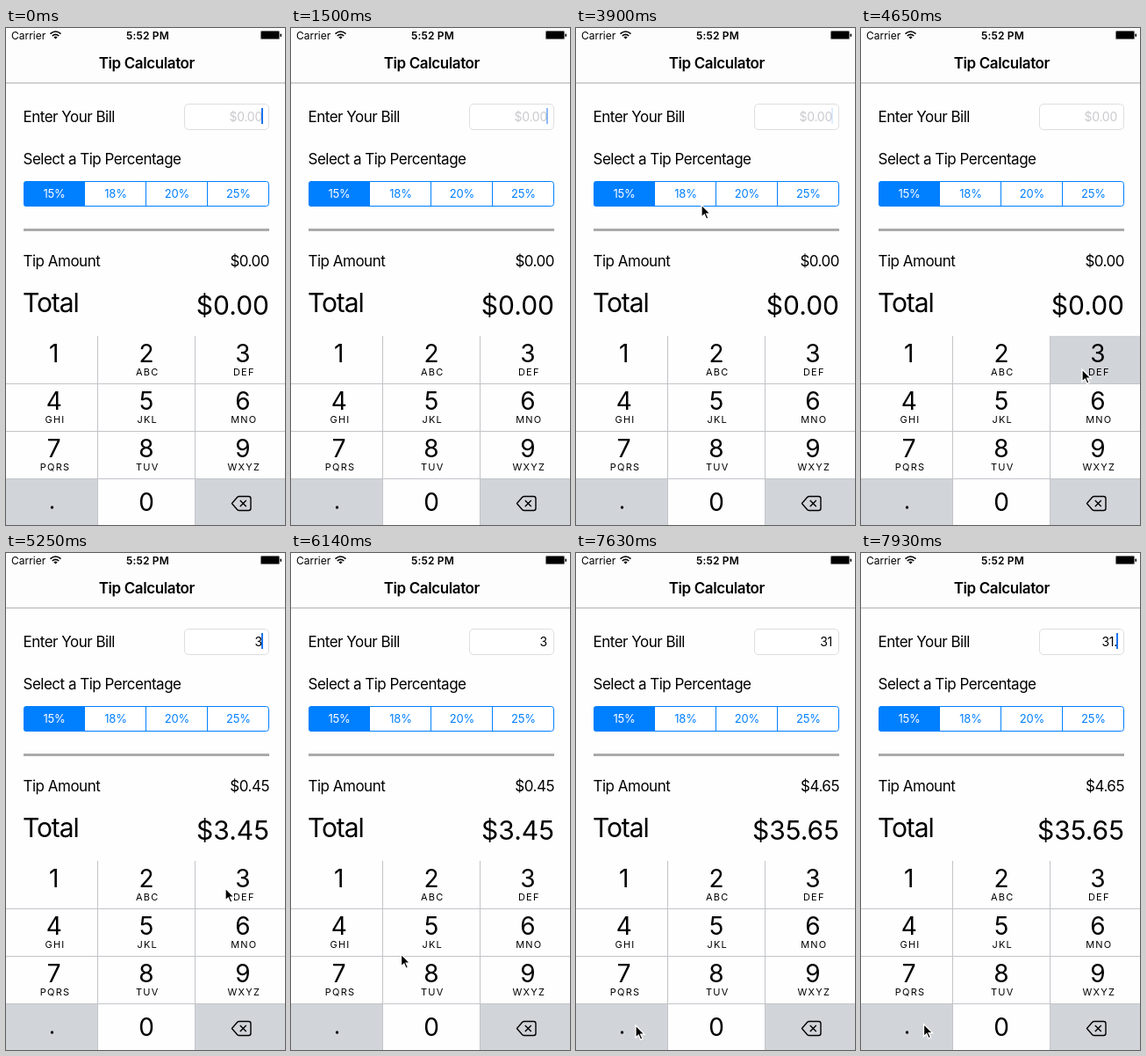
An HTML page that plays this animation: 318 by 565 pixels, repeating every 8 s.

```html
<!DOCTYPE html>
<html lang="en">
<head>
<meta charset="utf-8">
<title>Tip Calculator</title>
<style>
  html, body { margin: 0; width: 100%; height: 100%; overflow: hidden; background: #fff; }
  svg { display: block; font-family: Inter, Roboto, sans-serif; }
  .body { font-size: 17px; letter-spacing: -.5px; }
  .big { font-size: 30px; }
  .mid { text-anchor: middle; }
  .end { text-anchor: end; }
  .digit { font-size: 28px; text-anchor: middle; }
  .letters { font-size: 11px; letter-spacing: 1.2px; text-anchor: middle; }
  .bill { font-size: 14px; letter-spacing: -.25px; text-anchor: end; }
  .seg { font-size: 13px; letter-spacing: -.2px; text-anchor: middle; }
</style>
</head>
<body>
<svg width="318" height="565" viewBox="0 0 318 565">
  <rect width="318" height="565" fill="#fefefe"/>

  <!-- status and title bar -->
  <rect width="318" height="62" fill="#fdfdfd"/>
  <path d="M0 62.5H318" stroke="#b2b2b2"/>
  <text x="6" y="13" font-size="12">Carrier</text>
  <g fill="none" stroke="#000" stroke-width="1.6">
    <path d="M50.5 6.6Q56.5 1.4 62.5 6.6M52.7 9Q56.5 5.8 60.3 9"/>
    <path d="M54.4 10.4Q56.5 8.8 58.6 10.4L56.5 12.6Z" fill="#000" stroke="none"/>
  </g>
  <text class="mid" x="161.5" y="13" font-size="12" font-weight="600" letter-spacing=".15">5:52 PM</text>
  <rect x="290" y="3" width="22" height="10" rx="1.5" fill="#777"/>
  <rect x="291" y="4" width="20" height="8" rx="1"/>
  <rect x="312.5" y="6.5" width="1.5" height="3.5" rx=".7"/>
  <text class="mid" x="160.3" y="46" font-size="17" font-weight="600" letter-spacing="-.4">Tip Calculator</text>

  <!-- form -->
  <text class="body" x="19.5" y="106.5">Enter Your Bill</text>
  <rect x="203.5" y="86.5" width="96" height="29" rx="4.5" fill="#fff" stroke="#dedede"/>
  <text class="bill" id="bill" x="292" y="105.5"></text>
  <rect id="caret" x="291" y="91" width="2" height="18" fill="#1a74ee"/>
  <text class="body" x="19.5" y="154.5">Select a Tip Percentage</text>
  <g id="segments">
    <rect x="20.5" y="174.5" width="279" height="28" rx="3" fill="#fff" stroke="#007fff"/>
    <path d="M90 174H23.5a3.5 3.5 0 0 0-3.5 3.5v22a3.5 3.5 0 0 0 3.5 3.5H90z" fill="#007fff"/>
    <path d="M89.5 174V203M159.5 174V203M229.5 174V203" stroke="#007fff"/>
  </g>
  <rect x="20" y="228" width="280" height="3" fill="#aaa"/>
  <text class="body" x="19.5" y="270.5">Tip Amount</text>
  <text class="body end" id="tip" x="300" y="270.5"></text>
  <text class="big" x="19" y="323" letter-spacing="-1.1">Total</text>
  <text class="big end" id="total" x="300" y="326"></text>

  <!-- keypad -->
  <g id="keys"></g>
  <path d="M104.5 350V565M215.5 350V565M0 404.5H318M0 458.5H318M0 512.5H318" stroke="#c2c4c8"/>
  <g id="labels"></g>
  <g fill="none" stroke="#000" stroke-width="1.4" stroke-linejoin="round">
    <path d="M257.5 540.5L263.5 533.5Q264.5 532.5 266 532.5H276.5Q279 532.5 279 535V546Q279 548.5 276.5 548.5H266Q264.5 548.5 263.5 547.5Z"/>
    <path d="M266.8 537L273.8 544M273.8 537L266.8 544"/>
  </g>

  <path id="cursor" d="M0 0V14L3.3 11L5.6 16.3L8 15.2L5.7 10.1H10Z" stroke="#fff" stroke-width="1.3"/>
</svg>
<script>
const $ = id => document.getElementById(id);
const LOOP = 8000, STEP = 149.6;
const GREY = '#d1d4d9', WHITE = '#fefefe';

function add(parent, tag, attrs, text = '') {
  const el = document.createElementNS('http://www.w3.org/2000/svg', tag);
  for (const name in attrs) el.setAttribute(name, attrs[name]);
  el.textContent = text;
  return parent.appendChild(el);
}

[15, 18, 20, 25].forEach((rate, i) =>
  add($('segments'), 'text', { class: 'seg', x: 55 + 70 * i, y: 193, fill: i ? '#007fff' : '#fff' }, rate + '%'));

const columns = [[0, 105, 54.7], [105, 111, 160], [216, 102, 270]];
const letters = ['', 'ABC', 'DEF', 'GHI', 'JKL', 'MNO', 'PQRS', 'TUV', 'WXYZ'];
const keys = [...'123456789.0<'].map((label, i) => {
  const [x, width, cx] = columns[i % 3], y = 350 + 54 * Math.floor(i / 3);
  const idle = '.<'.includes(label) ? GREY : WHITE;
  const rect = add($('keys'), 'rect', { x, y, width, height: 54 });
  if (label === '.') add($('labels'), 'circle', { cx: 52.5, cy: 545, r: 1.7 });
  else if (label !== '<') add($('labels'), 'text', { class: 'digit', x: cx, y: y + (label === '0' ? 37 : 30) }, label);
  if (letters[i]) add($('labels'), 'text', { class: 'letters', x: cx + 1.3, y: y + 45 }, letters[i]);
  return { label, rect, idle, pressed: idle === GREY ? WHITE : GREY };
});

// Pointer path: step, x, y
const path = [
  [26, 143, 201], [27, 165, 245], [29, 232, 350], [30, 250, 385], [31, 252, 388],
  [33, 250, 381], [35, 250, 381], [37, 235, 410], [38, 212, 445], [39, 185, 465],
  [40, 156, 467], [42, 95, 445], [44, 55, 392], [45, 53, 387], [46, 53, 398],
  [47, 57, 491], [48, 61, 520], [50, 67, 537], [51, 68, 537], [53, 71.5, 535.5]
];

function pointer(step) {
  const i = Math.max(1, path.findIndex(p => p[0] >= step));
  const [s0, x0, y0] = path[i - 1], [s1, x1, y1] = path[i];
  const f = (step - s0) / (s1 - s0);
  return [x0 + (x1 - x0) * f, y0 + (y1 - y0) * f];
}

// Bill text, the step it appears, and when the caret starts blinking
const entries = [
  { step: 0, bill: '', blink: 0 },
  { step: 33, bill: '3', blink: 5450 },
  { step: 46, bill: '31', blink: 6890 },
  { step: 53, bill: '31.', blink: 7930 }
];
const presses = { 30: '3', 31: '3', 45: '1', 52: '.' };

const clamp = v => Math.min(1, Math.max(0, v));
const money = v => '$' + v.toFixed(2);

function caretAlpha(time) {
  const phase = Math.max(0, time) % 1000;
  return phase < 700 ? clamp((590 - phase) / 190) : clamp((phase - 875) / 110);
}

function draw() {
  const step = Math.floor(performance.now() % LOOP / STEP);
  const { bill, blink } = entries.findLast(e => e.step <= step);
  const amount = Number(bill);

  $('bill').textContent = bill || '$0.00';
  $('bill').setAttribute('fill', bill ? '#000' : '#cacace');
  $('tip').textContent = money(amount * .15);
  $('total').textContent = money(amount * 1.15);
  $('caret').setAttribute('opacity', caretAlpha(step * STEP - blink));

  for (const key of keys)
    key.rect.setAttribute('fill', presses[step] === key.label ? key.pressed : key.idle);

  const visible = step >= path[0][0];
  $('cursor').setAttribute('visibility', visible ? 'visible' : 'hidden');
  if (visible) $('cursor').setAttribute('transform', `translate(${pointer(step)})`);
  requestAnimationFrame(draw);
}
draw();
</script>
</body>
</html>
```
